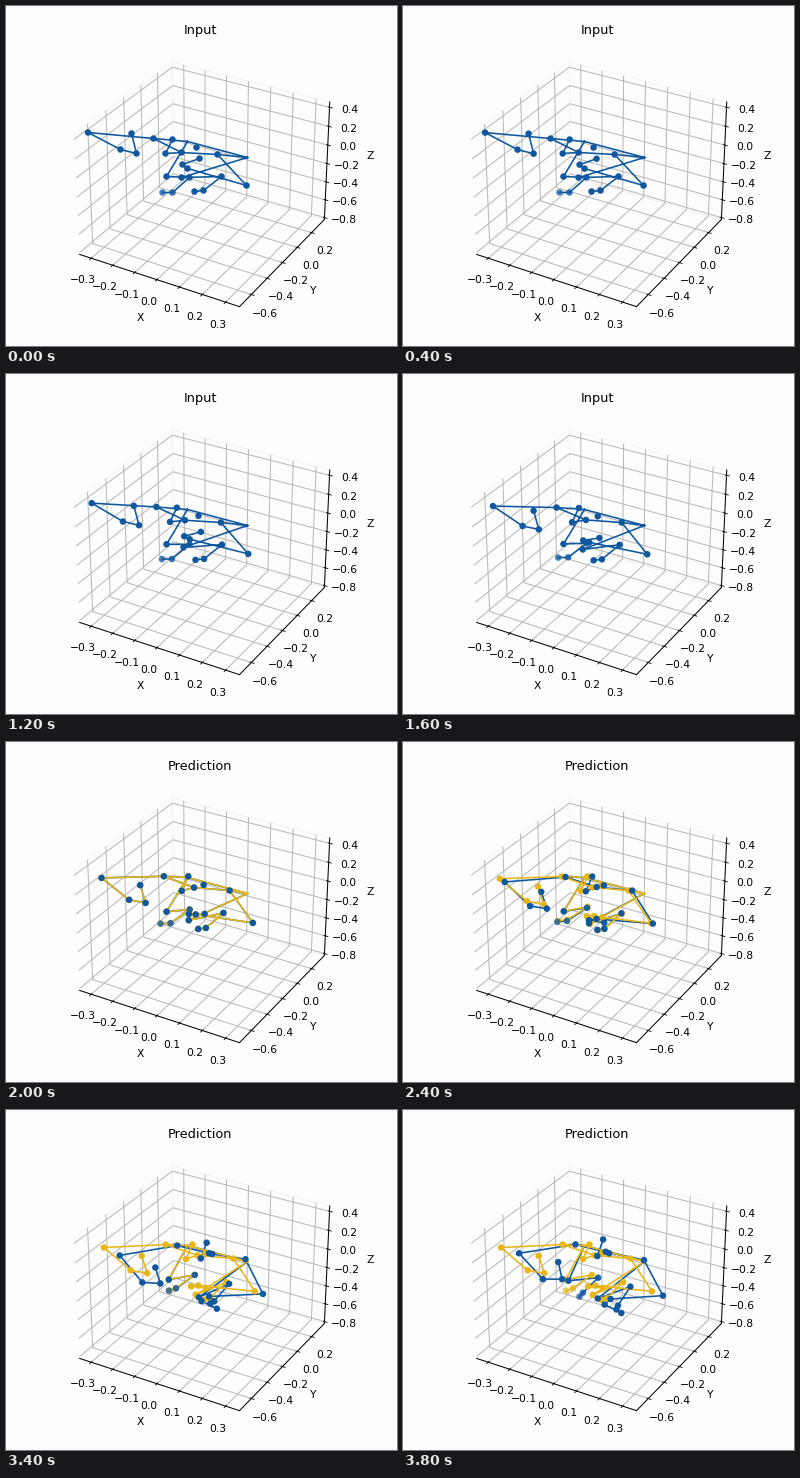
Recreate the animation shown at these times as a matplotlib script. Size 391 px wide and 340 px high, loop 4000 ms.

```python
import numpy as np
import matplotlib.pyplot as plt
from matplotlib.animation import FuncAnimation

W, H, DPI = 391, 340, 77
FRAMES, INTERVAL, SWITCH = 20, 200, 10
LAST = FRAMES - 1
BLUE, YELLOW = "#0f58a0", "#e8b717"
HIP_L, HIP_R = (181, 135), (241, 151)

plt.rcParams.update({
    "font.family": "DejaVu Sans", "axes.linewidth": 0.95,
    "grid.linewidth": 0.95, "grid.color": "#b8b8b8",
})


class Limb:
    """Joints that sway together, then kick late, most at the tip."""

    def __init__(self, joints, sway, kick, horizon, fade=1.0):
        n = len(joints)
        self.joints = np.array(joints, float)
        self.sway = np.array(sway, float)
        self.kick = np.outer(np.linspace(0.2, 1, n), kick)
        self.horizon = horizon  # time at which the forecast settles
        self.alpha = np.linspace(1, fade, n)

    def at(self, t):
        swing = np.sin(np.pi * t / 36) ** 3
        return self.joints + self.sway * swing + self.kick * (t / LAST) ** 7

    def forecast(self, t):
        u = (t - SWITCH) / (LAST - SWITCH)
        ease = 1 - (1 - u) ** 3
        return self.at(SWITCH + (self.horizon - SWITCH) * ease)


# Arms: shoulder, elbow, wrist, two hand joints.
arm_l = Limb([(147, 132), (81.5, 126), (114, 143), (130, 147), (125, 127)],
             [(23, 4), (30, 21), (19, 32), (20, 30), (19, 35)],
             kick=(11, -10), horizon=10.8)
arm_r = Limb([(211, 148), (240, 179), (181, 162), (176, 158), (193, 152)],
             [(27, 0), (14, 3), (18, 22), (14, 30), (11, 43)],
             kick=(14, 8), horizon=11.4)
# Legs: knee, ankle, foot, toe.
leg_l = Limb([(160, 170), (183, 171), (166, 186), (156, 186)],
             [(0, -2), (0, -9), (-5, -12), (-5, -11)],
             kick=(25, 11), horizon=17, fade=0.75)
leg_r = Limb([(175, 171), (215, 170), (197, 184), (188, 185)],
             [(16, 15), (4, 1), (5, 3), (8, 3)],
             kick=(17, 11), horizon=14.5)
# Back, neck, chin, head.
spine = Limb([(190, 141), (175, 146), (159, 147), (166, 133)],
             [(16, 3), (28, -2), (36, 3), (35, 2)],
             kick=(-1, -6), horizon=11.2)
BODY = [arm_l, arm_r, leg_l, leg_r, spine]
ALPHA = np.concatenate([limb.alpha for limb in BODY])


def bones(al, ar, ll, lr, sp):
    """All bones as one path, with gaps between the strands."""
    strands = [
        [HIP_L, *al], [HIP_R, *ar], [HIP_L, *ll], [HIP_R, *lr],
        [HIP_L, HIP_R], [al[0], sp[1], ar[0]], sp[1:],
    ]
    gap = [(np.nan, np.nan)]
    return np.vstack([part for s in strands for part in (s, gap)])


fig = plt.figure(figsize=((W + 1e-3) / DPI, (H + 1e-3) / DPI), dpi=DPI,
                 facecolor="#fdfdfd")

SIDE = 284.5
box = fig.add_axes([52.2 / W, 21.4 / H, SIDE / W, SIDE / H], projection="3d")
box.set_facecolor("none")
box.set_xticks(np.linspace(-0.3, 0.3, 7))
box.set_yticks(np.linspace(-0.6, 0.2, 5))
box.set_zticks(np.linspace(-0.8, 0.4, 7))
box.set(xlim=(-0.354, 0.359), ylim=(-0.745, 0.383), zlim=(-0.822, 0.455),
        xlabel="X", ylabel="Y", zlabel="Z")
for axis in (box.xaxis, box.yaxis, box.zaxis):
    axis.pane.set_facecolor("none")
    axis.pane.set_edgecolor("#ededed")
title = box.set_title("Input")

stage = fig.add_axes([0, 0, 1, 1])
stage.set(xlim=(-0.5, W - 0.5), ylim=(H - 0.5, -0.5))
stage.axis("off")


class Skeleton:
    def __init__(self, color, line_z, dot_z):
        self.line, = stage.plot([], [], color=color, lw=1.5, zorder=line_z)
        zero = np.zeros(len(ALPHA))
        self.dots = stage.scatter(zero, zero, s=37, c=color, alpha=ALPHA,
                                  linewidths=0, zorder=dot_z)

    def show(self, pose):
        self.line.set_data(*bones(*pose).T)
        self.dots.set_offsets(np.vstack(pose))

    def set_visible(self, on):
        self.line.set_visible(on)
        self.dots.set_visible(on)


truth = Skeleton(BLUE, 2, 5)
guess = Skeleton(YELLOW, 3, 4)


def draw(i):
    predicting = i >= SWITCH
    title.set_text("Prediction" if predicting else "Input")
    truth.show([limb.at(i) for limb in BODY])
    guess.set_visible(predicting)
    if predicting:
        guess.show([limb.forecast(i) for limb in BODY])
    return truth.line, truth.dots, guess.line, guess.dots, title


anim = FuncAnimation(fig, draw, frames=FRAMES, interval=INTERVAL,
                     repeat=True, repeat_delay=0, blit=False)
plt.show()
```
